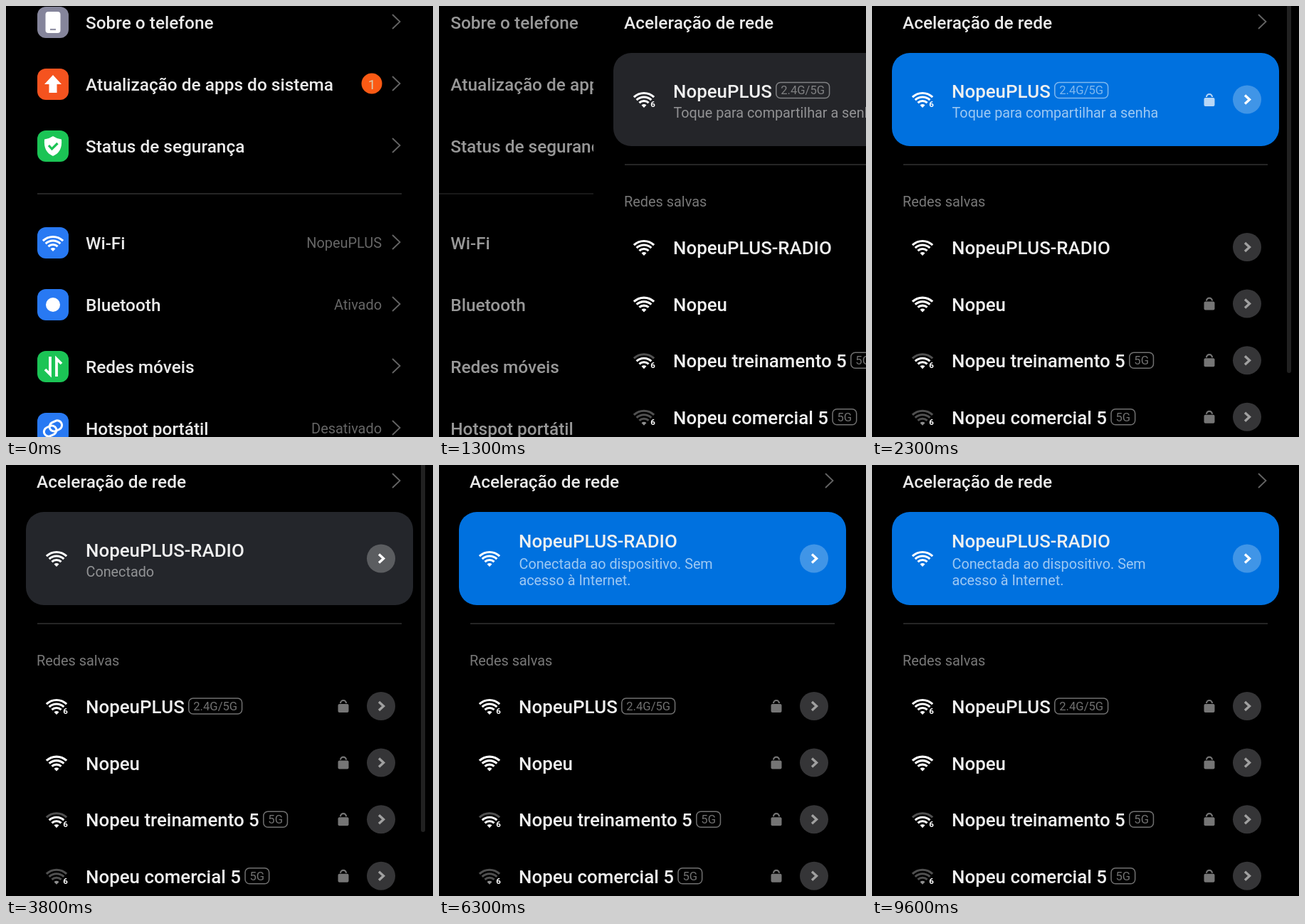
An HTML page with a canvas that plays this animation: 600x606 px, repeating every 9700 ms.

```html
<!DOCTYPE html>
<html lang="pt-BR">
<head>
<meta charset="utf-8">
<title>Redes Wi-Fi</title>
<style>
html, body { margin: 0; width: 100%; height: 100%; overflow: hidden; background: #000; }
canvas { display: block; }
</style>
</head>
<body>
<canvas id="stage" width="600" height="606"></canvas>
<script>
const ctx = document.getElementById('stage').getContext('2d');
const LOOP = 9700, WIDTH = 600, HEIGHT = 606;
const BLUE = '#2879f3', GREEN = '#1bc455';

const plus = { name: 'NopeuPLUS', band: '2.4G/5G', bars: 3, six: true, lock: true };
const radio = { name: 'NopeuPLUS-RADIO', bars: 3 };
const others = [
  { name: 'Nopeu', bars: 3, lock: true },
  { name: 'Nopeu treinamento 5', band: '5G', bars: 2, six: true, lock: true },
  { name: 'Nopeu comercial 5', band: '5G', bars: 0, six: true, lock: true }
];

const ramp = (t, from, to) => Math.min(1, Math.max(0, (t - from) / (to - from)));
const easeOut = p => 1 - (1 - p) ** 3;
const mix = (a, b, p) => a + (b - a) * p;
const white = alpha => `rgba(255,255,255,${alpha})`;

// y is the middle of the capital letters
function text(str, x, y, size, color, weight = 400, align = 'left') {
  ctx.font = `${weight} ${size}px Roboto, sans-serif`;
  ctx.textAlign = align;
  ctx.fillStyle = color;
  ctx.fillText(str, x, y + size * 0.355);
  return ctx.measureText(str).width;
}

function box(x, y, w, h, r, fill) {
  ctx.beginPath();
  ctx.roundRect(x, y, w, h, r);
  if (fill) { ctx.fillStyle = fill; ctx.fill(); }
}

function disc(x, y, r, fill) {
  ctx.beginPath();
  ctx.arc(x, y, r, 0, Math.PI * 2);
  ctx.fillStyle = fill;
  ctx.fill();
}

function stroke(color, width) {
  ctx.strokeStyle = color;
  ctx.lineWidth = width;
  ctx.stroke();
}

function line(points, color, width) {
  ctx.beginPath();
  points.forEach(([x, y]) => ctx.lineTo(x, y));
  stroke(color, width);
}

function shape(points, fill) {
  ctx.beginPath();
  points.forEach(([x, y]) => ctx.lineTo(x, y));
  ctx.closePath();
  ctx.fillStyle = fill;
  ctx.fill();
}

const chevron = y => line([[543, y - 10], [553.5, y], [543, y + 10]], '#646464', 1.8);
const divider = y => line([[44, y], [556, y]], '#323232', 1.6);

function fan(x, y, bars, arcs = [9.5, 15, 20.5], width = 3.1, wedge = 5) {
  const up = -Math.PI / 2, spread = 0.76;
  arcs.forEach((r, i) => {
    ctx.beginPath();
    ctx.arc(x, y + 12, r, up - spread, up + spread);
    stroke(i < bars ? '#fff' : '#505050', width);
  });
  ctx.beginPath();
  ctx.moveTo(x, y + 12);
  ctx.arc(x, y + 12, wedge, up - spread, up + spread);
  ctx.fillStyle = bars ? '#fff' : '#909090';
  ctx.fill();
}

// Glyphs of the settings list, drawn around the middle of their tile
const glyphs = {
  phone() {
    box(-10.5, -15, 21, 30, 4, '#fff');
    line([[-4, 10], [4, 10]], '#9292a5', 2.2);
  },
  arrow() {
    shape([[0, -13], [12, 0], [5.5, 0], [5.5, 12], [-5.5, 12], [-5.5, 0], [-12, 0]], '#fff');
  },
  shield() {
    ctx.beginPath();
    ctx.moveTo(0, -14);
    ctx.quadraticCurveTo(6, -10, 12, -9.5);
    ctx.bezierCurveTo(13, 3, 9, 10, 0, 14);
    ctx.bezierCurveTo(-9, 10, -13, 3, -12, -9.5);
    ctx.quadraticCurveTo(-6, -10, 0, -14);
    ctx.fillStyle = '#fff';
    ctx.fill();
    line([[-6, -1], [-1.5, 4], [6.5, -4]], GREEN, 3.2);
  },
  fan() { fan(0, 0, 3); },
  dot() { disc(0, 0, 10, '#fff'); },
  transfer() {
    line([[-4, -14], [-4, 11], [-11, 4]], '#fff', 3.8);
    line([[5, 14], [5, -11], [12, -4]], '#fff', 3.8);
  },
  link() {
    ctx.rotate(-0.45);
    box(-14, -5, 18, 13, 6.5);
    stroke('#fff', 3);
    box(-4, -8, 18, 13, 6.5);
    stroke('#fff', 3);
  }
};

const settings = [
  { y: 23, label: 'Sobre o telefone', tile: '#85859b', glyph: 'phone' },
  { y: 110, label: 'Atualização de apps do sistema', tile: '#f5531f', glyph: 'arrow', count: '1' },
  { y: 197, label: 'Status de segurança', tile: GREEN, glyph: 'shield' },
  { y: 333, label: 'Wi-Fi', tile: BLUE, glyph: 'fan', value: plus.name },
  { y: 420, label: 'Bluetooth', tile: BLUE, glyph: 'dot', value: 'Ativado' },
  { y: 507, label: 'Redes móveis', tile: GREEN, glyph: 'transfer' },
  { y: 594, label: 'Hotspot portátil', tile: BLUE, glyph: 'link', value: 'Desativado' }
];

function drawSettings() {
  for (const { y, label, tile, glyph, value, count } of settings) {
    box(44, y - 22, 44, 44, 12, tile);
    ctx.save();
    ctx.translate(66, y);
    glyphs[glyph]();
    ctx.restore();
    text(label, 112, y, 24.4, '#ebebeb', 500);
    if (value) text(value, 528, y, 19.9, '#666', 400, 'right');
    if (count) {
      disc(514, y - 1, 14.5, '#fb5a14');
      text(count, 514, y, 19, '#d8cfb0', 400, 'center');
    }
    chevron(y - 1);
  }
  divider(264);
}

function padlock(x, y, color) {
  box(x - 7.5, y - 3, 15, 12, 2, color);
  ctx.beginPath();
  ctx.arc(x, y - 4, 4, Math.PI, 0);
  stroke(color, 2.2);
}

function moreButton(y, fill, color) {
  disc(527, y, 20, fill);
  line([[524, y - 6], [530.5, y], [524, y + 6]], color, 3.4);
}

function networkName(net, y, bandColor) {
  const end = 112 + text(net.name, 112, y, 25.9, '#f0f0f0', 500);
  if (!net.band) return;
  const w = text(net.band, end + 12.5, y - 1, 16.6, bandColor) + 13;
  box(end + 6, y - 12, w, 22, 6);
  stroke(bandColor, 1.5);
}

function signal(net, y) {
  fan(71, y, net.bars);
  if (net.six) text('6', 83.5, y + 7, 11.5, '#fff', 700, 'center');
}

function drawRow(net, y) {
  signal(net, y - 1);
  networkName(net, y, '#707070');
  if (net.lock) padlock(474, y - 1, '#757575');
  moreButton(y - 1, '#353537', '#a0a0a0');
}

function drawCard(t, net, status) {
  const active = t < 3200
    ? ramp(t, 1900, 2200) * (1 - ramp(t, 3100, 3300))
    : easeOut(ramp(t, 3800, 4100));
  const rgb = [[36, 0], [37, 113], [41, 223]].map(([a, b]) => Math.round(mix(a, b, active)));
  box(28, 66, 544, 131, 25, `rgb(${rgb})`);

  const searching = t >= 3900 && t < 4300;
  if (searching) fan(71, 129, 1, [18.5], 4.2, 9);
  else signal(net, 131);

  const twoLines = status.length > 1;
  networkName(net, twoLines ? 107 : 119.5, white(mix(0.42, 0.5, active)));
  status.forEach((s, i) =>
    text(s, 112.5, (twoLines ? 139 : 150) + i * 22.5, 19.8, white(mix(0.5, 0.62, active))));
  if (net.lock) padlock(474, 132, white(mix(0.45, 0.72, active)));
  moreButton(131.5, white(0.25), '#fff');
}

function cardStatus(t) {
  if (t < 3200) return ['Toque para compartilhar a senha'];
  if (t < 3800) return ['Conectando...'];
  if (t < 3900) return ['Conectado'];
  return ['Conectada ao dispositivo. Sem', 'acesso à Internet.'];
}

function drawNetworks(t) {
  ctx.fillStyle = '#000';
  ctx.fillRect(0, 0, WIDTH, HEIGHT);
  text('Aceleração de rede', 43, 23, 24.4, '#ebebeb', 500);
  chevron(22);

  const [current, saved] = t < 3200 ? [plus, radio] : [radio, plus];
  drawCard(t, current, cardStatus(t));
  divider(223);
  text('Redes salvas', 43, 275, 19.9, '#787878');
  [saved, ...others].forEach((net, i) => drawRow(net, 340 + i * 79.6));

  const bar = 0.13 * (1 - ramp(t, 5600, 6100));
  box(583, -10, 6, 526, 3, white(bar));
}

// Critically damped spring
function slide(t) {
  if (t >= 2050) return 1;
  const s = Math.max(0, t - 1050) * 0.00865;
  return 1 - (1 + s) * Math.exp(-s);
}

function draw(t) {
  const p = slide(t);
  ctx.fillStyle = '#000';
  ctx.fillRect(0, 0, WIDTH, HEIGHT);
  if (p < 1) {
    ctx.save();
    ctx.translate(-WIDTH / 4 * p, 0);
    drawSettings();
    ctx.restore();
    ctx.fillStyle = `rgba(0,0,0,${0.55 * p})`;
    ctx.fillRect(0, 0, WIDTH, HEIGHT);
  }
  if (p > 0) {
    ctx.save();
    ctx.translate(WIDTH * (1 - p), 0);
    drawNetworks(t);
    ctx.restore();
  }
}

const start = performance.now();
function tick() {
  draw((performance.now() - start) % LOOP);
  requestAnimationFrame(tick);
}
tick();
</script>
</body>
</html>
```
